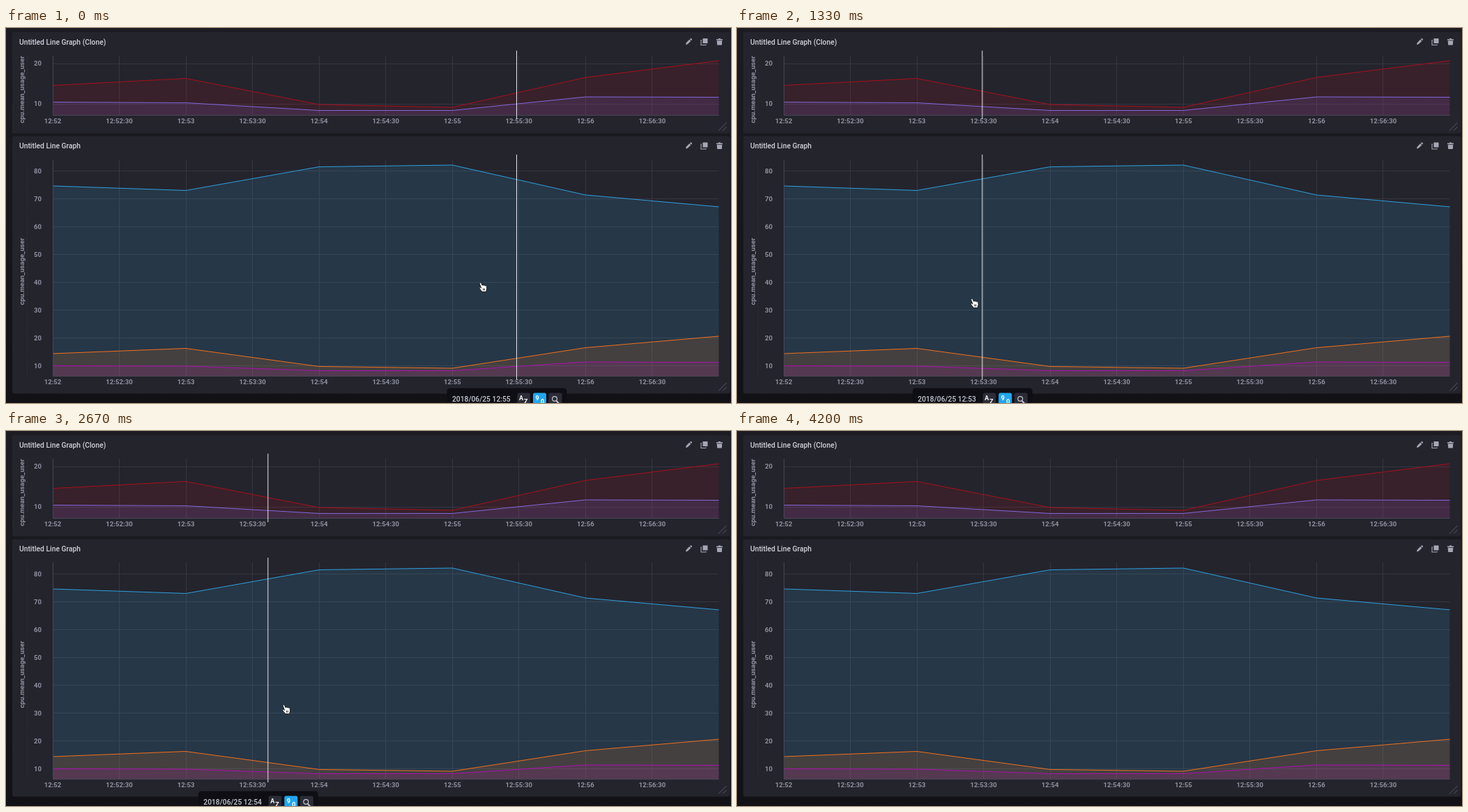
Animation of 1040 by 539 pixels, one loop 4.34 s. Source, as an HTML page:

```html
<!DOCTYPE html>
<html lang="en">
<head>
<meta charset="utf-8">
<title>Linked line graphs</title>
<style>
html, body { margin: 0; width: 100%; height: 100%; overflow: hidden; background: #18181d; }
svg { display: block; width: 1040px; height: 539px; font: 500 10.3px Roboto, sans-serif; }
.title { fill: #d0d2dc; }
.axis { font-size: 9.6px; font-weight: 700; fill: #8e919f; }
.mid { text-anchor: middle; }
.end { text-anchor: end; }
.grid { stroke: #363642; fill: none; }
.frame { stroke: #464655; fill: none; }
.icon { fill: #a4a7b4; }
.grip { stroke: #585a68; fill: none; }
.hair { stroke: #e6e6ec; }
.sort { font-size: 9px; font-weight: 700; fill: #fff; }
</style>
</head>
<body>
<svg viewBox="0 0 1040 539">
  <defs>
    <linearGradient id="page" x2="0" y2="1">
      <stop stop-color="#1c1c22"/><stop offset="1" stop-color="#121116"/>
    </linearGradient>
    <g id="tools" class="icon">
      <path d="M975 24l.7-2.8 4.6-4.6 2.1 2.1-4.6 4.6zM981 15.9l.8-.8q.6-.5 1.2 0l.9.9q.5.6 0 1.2l-.8.8z"/>
      <path d="M999.5 15h7v7h-7z"/>
      <path d="M998 17.5h-1v7h7v-1" fill="none" stroke="#a4a7b4" stroke-width="1.1"/>
      <path d="M1019 16h3v-1h3v1h3v1.4h-9zM1019.7 18.3h7.6l-.5 6.2h-6.6z"/>
    </g>
  </defs>
  <rect width="1040" height="539" fill="url(#page)"/>
  <g id="panels"></g>
  <g id="hover">
    <path id="hair" class="hair" d="M0 32.5V131M0 182V505"/>
    <g id="legend">
      <rect x="-1" y="517" width="173" height="30" rx="5" fill="#0f0e15" opacity=".4"/>
      <rect y="518" width="171" height="30" rx="4" fill="#0f0e15"/>
      <text id="stamp" x="7" y="537.3" fill="#c6cad3"></text>
      <rect x="100.5" y="524.5" width="18.5" height="20" rx="2.5" fill="#2c2c37"/>
      <rect x="123" y="524.5" width="19" height="20" rx="2.5" fill="#22a6f0"/>
      <rect x="145.5" y="524.5" width="19" height="20" rx="2.5" fill="#2c2c37"/>
      <text class="sort" x="103" y="535">A</text><text class="sort" x="110" y="540">Z</text>
      <text class="sort" x="126.5" y="534.5">9</text><text class="sort" x="134" y="540">0</text>
      <path d="M156.5 536l3.5 3.5" stroke="#c6cad3" stroke-width="1.8"/>
      <circle cx="154" cy="533" r="3.4" fill="none" stroke="#c6cad3" stroke-width="1.2"/>
    </g>
  </g>
  <path id="hand" fill="#fff" stroke="#111" stroke-width=".9" stroke-linejoin="round"
    d="M-4.6-5.4c-.6-1.6 1.6-2.3 2.3-.9l1.5 3.4c.3-1.2 2-1 2.2.1c.5-.9 2-.6 2.1.4c.7-.6 1.9-.1 2 .9l.3 2.6c.1 1.5-.6 2.4-.8 3.6v1.4h-6.6l-.3-1.2c-.9-1.2-2-2.2-3-3.9c-.5-1 .6-1.9 1.6-1l1 .9zM.6 1.2v3M2.4 1.2v3"/>
</svg>
<script>
const LOOP = 4340, STEP = 1000 / 15;
const LEFT = 67, RIGHT = 1022.5, TICK = 95.55;
const byId = id => document.getElementById(id);

const panels = [
  { title: 'Untitled Line Graph (Clone)', y: 6, h: 145.5, top: 40, base: 125.5, mid: 88.5,
    ticks: [[20, 51], [10, 109]],
    series: [
      ['#a8101c', [82.5, 72.5, 110, 114, 71, 47]],
      ['#8068dc', [106.5, 107.5, 118.5, 118.5, 99, 99.5]]] },
  { title: 'Untitled Line Graph', y: 155.5, h: 370, top: 189, base: 500.5, mid: 350,
    ticks: [80, 70, 60, 50, 40, 30, 20, 10].map((v, i) => [v, 205.5 + i * 40.05]),
    series: [
      ['#2f9fdc', [227, 233.5, 199.5, 197, 240, 257]],
      ['#f0701c', [468, 460.5, 486.5, 489, 459.5, 443]],
      ['#ac10b0', [485.5, 486, 492.5, 492.5, 480, 480.5]]] }
];

function timeLabel(k) {
  return `12:${52 + (k >> 1)}${k % 2 ? ':30' : ''}`;
}

function drawSeries([color, ys], base) {
  const line = 'M' + ys.map((y, i) => `${LEFT + i * 2 * TICK} ${y}`).join('L');
  return `<path d="${line}V${base}H${LEFT}z" fill="${color}" opacity=".15"/>
    <path d="${line}" fill="none" stroke="${color}"/>`;
}

function drawPanel(p) {
  const bottom = p.y + p.h;
  let out = `<rect x="9" y="${p.y}" width="1029.5" height="${p.h}" rx="3" fill="#24242d"/>
    <text class="title" x="19" y="${p.y + 17.5}">${p.title}</text>
    <use href="#tools" y="${p.y - 6}"/>
    <path class="grip" d="M1022 ${bottom - 4}l11.5-11.5M1028 ${bottom - 4}l5.5-5.5"/>
    <path class="grid" stroke-dasharray="1 2" d="M30.5 ${p.top}V${p.base}"/>
    <text class="axis mid" transform="translate(26.3 ${p.mid})rotate(-90)">cpu.mean_usage_user</text>`;
  for (let k = 0; k < 10; k++) {
    const x = LEFT + k * TICK;
    out += `<path class="grid" d="M${Math.floor(x) + .5} ${p.top}V${p.base}"/>
      <text class="axis mid" x="${x}" y="${p.base + 11.7}">${timeLabel(k)}</text>`;
  }
  for (const [v, y] of p.ticks) {
    out += `<path class="grid" d="M${LEFT} ${Math.floor(y) + .5}H${RIGHT}"/>
      <text class="axis end" x="51" y="${y + 3.4}">${v}</text>`;
  }
  out += p.series.map(s => drawSeries(s, p.base)).join('');
  return out + `<path class="frame" d="M67.5 ${p.top}V${p.base}H${RIGHT}"/>`;
}

byId('panels').innerHTML = panels.map(drawPanel).join('');

// Pointer path: time, x, y
const path = [[0, 684, 373], [800, 467, 387.5], [1333, 340.5, 396], [1900, 175, 399], [2130, 134, 399],
  [2333, 137.5, 399.5], [2600, 372, 401], [2667, 402, 400.5], [3267, 776.5, 376], [3533, 966, 369], [3667, 1028, 365]];

// The crosshair moves only when the nearest data point changes: time, x, minute
const hovers = [[0, 732.5, 55], [600, 541.5, 54], [1320, 351.8, 53], [2050, 158.5, 52],
  [2600, 375.8, 54], [2930, 550.3, 55], [3330, 776.5, 56], [3600, 966.5, 57]];
const LEAVE = 3730;

function pointerAt(t) {
  const i = Math.max(1, path.findIndex(p => p[0] >= t));
  const [a, b] = [path[i - 1], path[i]];
  const u = Math.min(1, (t - a[0]) / (b[0] - a[0]));
  return [a[1] + (b[1] - a[1]) * u, a[2] + (b[2] - a[2]) * u];
}

function draw(now) {
  const t = Math.floor((now % LOOP + 4) / STEP) * STEP;
  const inside = t < LEAVE - 5;
  byId('hover').style.display = byId('hand').style.display = inside ? '' : 'none';
  if (inside) {
    const [, x, minute] = hovers.findLast(h => h[0] <= t + 4);
    byId('hair').setAttribute('transform', `translate(${x})`);
    byId('legend').setAttribute('transform', `translate(${x - 99.5})`);
    byId('stamp').textContent = `2018/06/25 12:${minute}`;
    byId('hand').setAttribute('transform', `translate(${pointerAt(Math.min(t, 3667))})`);
  }
}

const start = performance.now();
function tick() {
  draw(performance.now() - start);
  requestAnimationFrame(tick);
}
tick();
</script>
</body>
</html>
```
